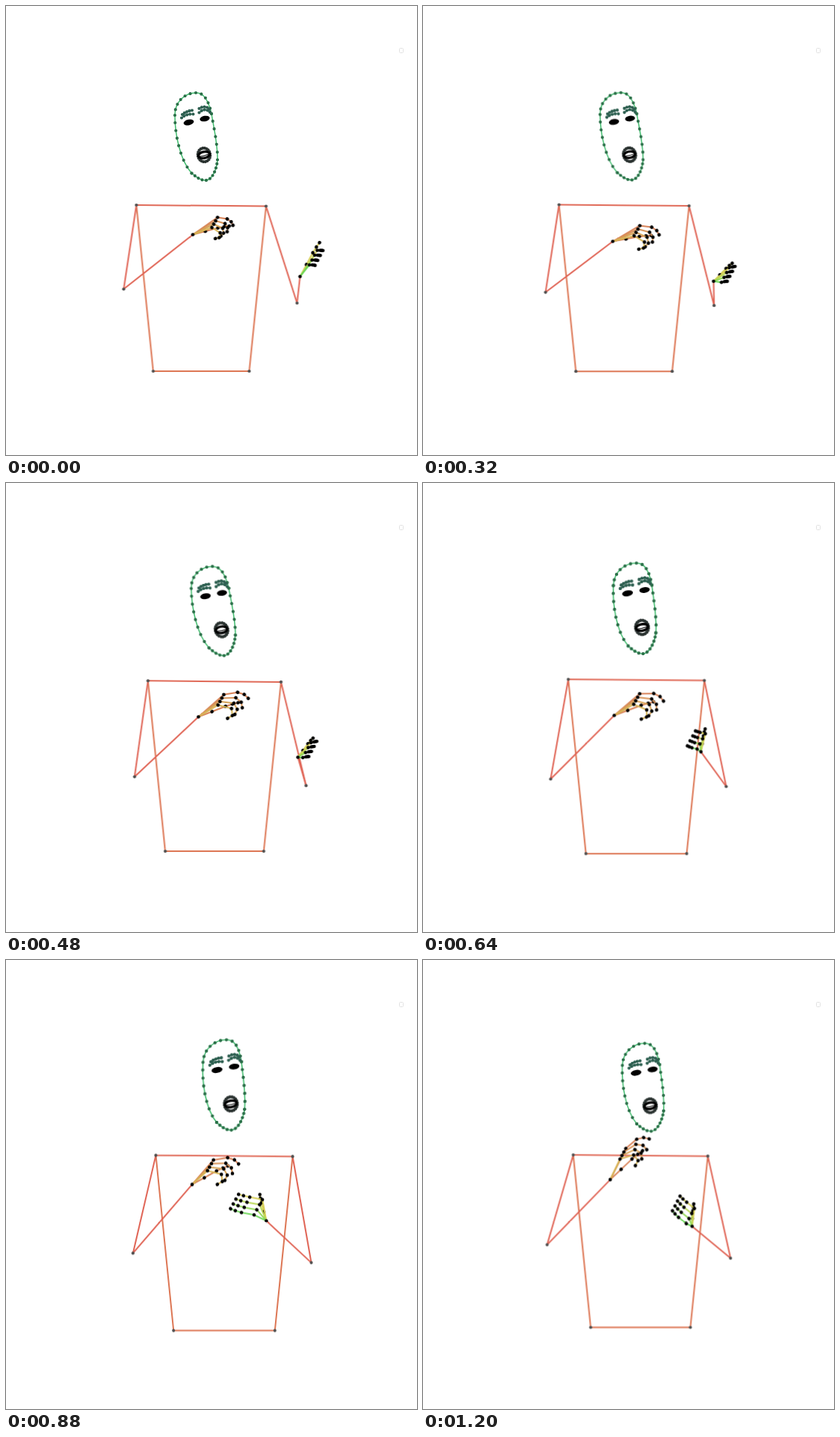
These frames come from a looping animation (550x600 px, 1.28 s). An HTML page without scripts:

```html
<!DOCTYPE html>
<html lang="en">
<head>
<meta charset="utf-8">
<title>Signing pose</title>
<style>
/* Vectors of an arm: elbow, wrist, index knuckle, first finger bone. */
@property --ex { syntax: "<number>"; inherits: true; initial-value: 0; }
@property --ey { syntax: "<number>"; inherits: true; initial-value: 0; }
@property --wx { syntax: "<number>"; inherits: true; initial-value: 0; }
@property --wy { syntax: "<number>"; inherits: true; initial-value: 0; }
@property --kx { syntax: "<number>"; inherits: true; initial-value: 0; }
@property --ky { syntax: "<number>"; inherits: true; initial-value: 0; }
@property --fx { syntax: "<number>"; inherits: true; initial-value: 0; }
@property --fy { syntax: "<number>"; inherits: true; initial-value: 0; }

html, body { margin: 0; width: 100%; height: 100%; overflow: hidden; background: #fff; }
svg { display: block; width: 550px; height: 600px; }
path, ellipse { fill: none; }

/* Every stretch between poses advances in 80 ms steps. */
@keyframes sway {
  0% { transform: translate(174.5px, 266px); animation-timing-function: steps(2); }
  12.5% { transform: translate(175px, 266.7px) scale(.991); animation-timing-function: steps(2); }
  25% { transform: translate(182px, 265.5px) scale(1.003); animation-timing-function: steps(2); }
  37.5% { transform: translate(190px, 264.3px) scale(1.026); animation-timing-function: steps(3); }
  56.25% { transform: translate(196.6px, 261.4px) scale(1.061); animation-timing-function: steps(2); }
  68.75% { transform: translate(200.5px, 261px) scale(1.055); animation-timing-function: steps(4); }
  93.75%, 100% { transform: translate(201px, 260.5px) scale(1.038); }
}
@keyframes left {
  0% { --ex: -17; --ey: 112.3; --wx: 92.5; --wy: -72.8; --kx: 33; --ky: -23; --fx: 13; --fy: 2; animation-timing-function: steps(2); }
  12.5% { --ex: -14; --ey: 113.5; --wx: 79; --wy: -73; --kx: 30; --ky: -21; --fx: 11; --fy: 4; animation-timing-function: steps(2); }
  25% { --ex: -18; --ey: 116.7; --wx: 89.7; --wy: -67.8; --kx: 36; --ky: -21; --fx: 16; --fy: 2; animation-timing-function: steps(2); }
  37.5% { --ex: -17.5; --ey: 125; --wx: 83.3; --wy: -78; --kx: 33; --ky: -29; --fx: 18; --fy: -3; animation-timing-function: steps(3); }
  56.25% { --ex: -25; --ey: 128; --wx: 80; --wy: -82.5; --kx: 32; --ky: -27; --fx: 18; --fy: 1; animation-timing-function: steps(2); }
  68.75% { --ex: -29; --ey: 124; --wx: 75; --wy: -87; --kx: 27; --ky: -31; --fx: 18; --fy: -3; animation-timing-function: steps(4); }
  93.75%, 100% { --ex: -33.7; --ey: 115.6; --wx: 81.4; --wy: -83.8; --kx: 20; --ky: -40; --fx: 14; --fy: -12; }
}
@keyframes right {
  0% { --ex: 41.5; --ey: 129.5; --wx: 4; --wy: -35.5; --kx: 23; --ky: -35; --fx: 4; --fy: 0; animation-timing-function: steps(2); }
  12.5% { --ex: 33.3; --ey: 133.2; --wx: 7.6; --wy: -31.3; --kx: 22; --ky: -30; --fx: 5; --fy: 0; animation-timing-function: steps(2); }
  25% { --ex: 33.4; --ey: 132.8; --wx: -.7; --wy: -32.4; --kx: 21; --ky: -18; --fx: 4; --fy: -1; animation-timing-function: steps(2); }
  37.5% { --ex: 32.7; --ey: 135; --wx: -10.7; --wy: -37; --kx: 17; --ky: -19; --fx: 4; --fy: -1; animation-timing-function: steps(3); }
  56.25% { --ex: 25.5; --ey: 135; --wx: -43; --wy: -47.8; --kx: 0; --ky: -25; --fx: -12; --fy: -2; animation-timing-function: steps(2); }
  68.75% { --ex: 23.7; --ey: 134.5; --wx: -57; --wy: -53; --kx: -5; --ky: -27; --fx: -16; --fy: -3; animation-timing-function: steps(4); }
  93.75%, 100% { --ex: 29.3; --ey: 131.4; --wx: -49.5; --wy: -41; --kx: 3; --ky: -23; --fx: -10; --fy: -8; }
}
@keyframes tilt {
  0% { transform: matrix(1, 0, 0, 1, 0, 0); animation-timing-function: steps(6); }
  37.5% { transform: matrix(1, .03, .01, .99, 5.2, .5); animation-timing-function: steps(3); }
  56.25% { transform: matrix(1, .028, -.075, .98, 4.4, 1.2); animation-timing-function: steps(6); }
  93.75%, 100% { transform: matrix(.98, .02, -.045, .965, 10, 4.3); }
}

.body { animation: sway 1280ms infinite; }
.head { transform-origin: 255px 175px; animation: tilt 1280ms infinite; }
.left { animation: left 1280ms infinite; --sx: -2.5; --sy: 4.5; --fan: 8deg; --curl: 45deg; --thumb: 20deg; --hue: 20; --shift: 8; }
.right { animation: right 1280ms infinite; --sx: -3.5; --sy: 6.5; --fan: 0deg; --curl: 4deg; --thumb: -5deg; --hue: 56; --shift: 18; }

/* A unit bone is turned and stretched onto its vector; strokes keep their width. */
.bone, .dot { vector-effect: non-scaling-stroke; }
.bone { stroke-width: 2; }
.dot { stroke: #000; stroke-width: 4.6; stroke-linecap: round; }
.grey { stroke: #505050; stroke-width: 4.2; }
.upper { transform: matrix(var(--ex), var(--ey), calc(-1 * var(--ey)), var(--ex), 0, 0); }
.elbow { transform: translate(calc(var(--ex) * 1px), calc(var(--ey) * 1px)); }
.fore { transform: matrix(var(--wx), var(--wy), calc(-1 * var(--wy)), var(--wx), 0, 0); }
.wrist { transform: translate(calc(var(--wx) * 1px), calc(var(--wy) * 1px)); }

/* Knuckles lie in a row; --i counts from index to little finger. */
.finger {
  --px: calc(var(--kx) + var(--i) * var(--sx));
  --py: calc(var(--ky) + var(--i) * var(--sy));
  --dx: var(--fx);
  --dy: var(--fy);
  stroke: hsl(calc(var(--hue) + var(--shift) * var(--i)) 62% 59%);
}
.thumb {
  --i: 0;
  --px: calc(.43 * (var(--kx) * cos(var(--thumb)) - var(--ky) * sin(var(--thumb))));
  --py: calc(.43 * (var(--kx) * sin(var(--thumb)) + var(--ky) * cos(var(--thumb))));
  --dx: var(--px);
  --dy: var(--py);
  --curl: 6deg;
}
.palm { transform: matrix(var(--px), var(--py), calc(-1 * var(--py)), var(--px), 0, 0); }
.knuckle {
  transform: translate(calc(var(--px) * 1px), calc(var(--py) * 1px))
    matrix(var(--dx), var(--dy), calc(-1 * var(--dy)), var(--dx), 0, 0)
    rotate(calc(var(--i) * var(--fan)));
}
.mid { transform: translate(1px, 0) rotate(calc(var(--curl) * (.6 + .3 * var(--i)))); }
.end { transform: translate(.5px, 0) rotate(calc(var(--curl) * (.6 + .3 * var(--i)))); }

/* Rows of dots: path lengths count the gaps. */
.line { stroke-width: 1.5; }
.dots { stroke-width: 4.2; stroke-linecap: round; stroke-dasharray: 0 1; }
</style>
</head>
<body>
<svg viewBox="0 0 550 600">
  <defs>
    <path id="dot" class="dot" d="M0 0h.01"/>
    <path id="joint" class="dot grey" d="M0 0h.01"/>
    <g id="finger">
      <path class="bone palm" d="M0 0H1"/>
      <g class="knuckle">
        <path class="bone" d="M0 0H1"/>
        <use href="#dot"/>
        <g class="mid">
          <path class="bone" d="M0 0H.5"/>
          <use href="#dot"/>
          <g class="end">
            <path class="bone" d="M0 0H.4"/>
            <use href="#dot"/>
            <use href="#dot" x=".4"/>
          </g>
        </g>
      </g>
    </g>
    <g id="arm" stroke="#e06455">
      <path class="bone upper" d="M0 0H1"/>
      <g class="elbow">
        <path class="bone fore" d="M0 0H1"/>
        <use href="#joint"/>
        <g class="wrist">
          <use href="#finger" class="finger thumb"/>
          <use href="#finger" class="finger" style="--i: 0"/>
          <use href="#finger" class="finger" style="--i: 1"/>
          <use href="#finger" class="finger" style="--i: 2"/>
          <use href="#finger" class="finger" style="--i: 3"/>
          <use href="#dot"/>
        </g>
      </g>
    </g>
    <g id="oval">
      <path pathLength="6" d="M275 144C277.5 160 283.5 185 283 205.5"/>
      <path pathLength="10" d="M283 205.5C282 218 276 233 267 233 260 233 254 228 248.5 223.5"/>
      <path pathLength="8" d="M248.5 223.5C233 206 226 172 226 146"/>
      <path pathLength="11" d="M226 146C226 128 239 116 255 116 267 116 272 131 275 144"/>
    </g>
    <g id="brows">
      <path pathLength="4.01" d="M235 149.5Q241 144 250.5 144.5"/>
      <path pathLength="4.01" d="M236 145Q241 140.5 249 139.5"/>
      <path pathLength="4.01" d="M258.5 142.5Q266 135 273 142"/>
      <path pathLength="4.01" d="M258.5 137Q267 132 272 138"/>
    </g>
    <ellipse id="ring" rx="8.2" ry="9.2" pathLength="20"/>
  </defs>

  <rect x="526.5" y="56.5" width="5" height="6" rx="1" fill="none" stroke="#e2e2e2"/>

  <g class="body">
    <path class="bone" stroke="#dd7755" d="M0 0 22.5 222H151L173.5 1.5"/>
    <path class="bone" stroke="#e06a58" d="M0 0 173.5 1.5"/>
    <use href="#arm" class="left"/>
    <g transform="translate(173.5 1.5)"><use href="#arm" class="right"/></g>
    <use href="#joint"/>
    <use href="#joint" x="173.5" y="1.5"/>
    <use href="#joint" x="22.5" y="222"/>
    <use href="#joint" x="151" y="222"/>

    <g transform="translate(-174.5 -266)">
      <g class="head">
        <use href="#oval" class="line" stroke="#41bd6e"/>
        <use href="#oval" class="dots" stroke="#2a6f48"/>
        <use href="#brows" class="line" stroke="#3c8069"/>
        <use href="#brows" class="dots" stroke="#2d5f50"/>
        <ellipse cx="244.5" cy="155.5" rx="7" ry="3.8" style="fill: #000" transform="rotate(-12 244.5 155.5)"/>
        <ellipse cx="266" cy="150.5" rx="6.7" ry="3.7" style="fill: #000" transform="rotate(-10 266 150.5)"/>
        <g stroke="#2b3331" transform="translate(265 199) rotate(-12)">
          <use href="#ring" class="line"/>
          <use href="#ring" class="dots"/>
          <ellipse rx="7.6" ry="4.2" stroke="#000" stroke-width="3.2"/>
          <path d="M-7 .6Q0 1.8 7 .2" stroke="#000"/>
        </g>
      </g>
    </g>
  </g>
</svg>
</body>
</html>
```
